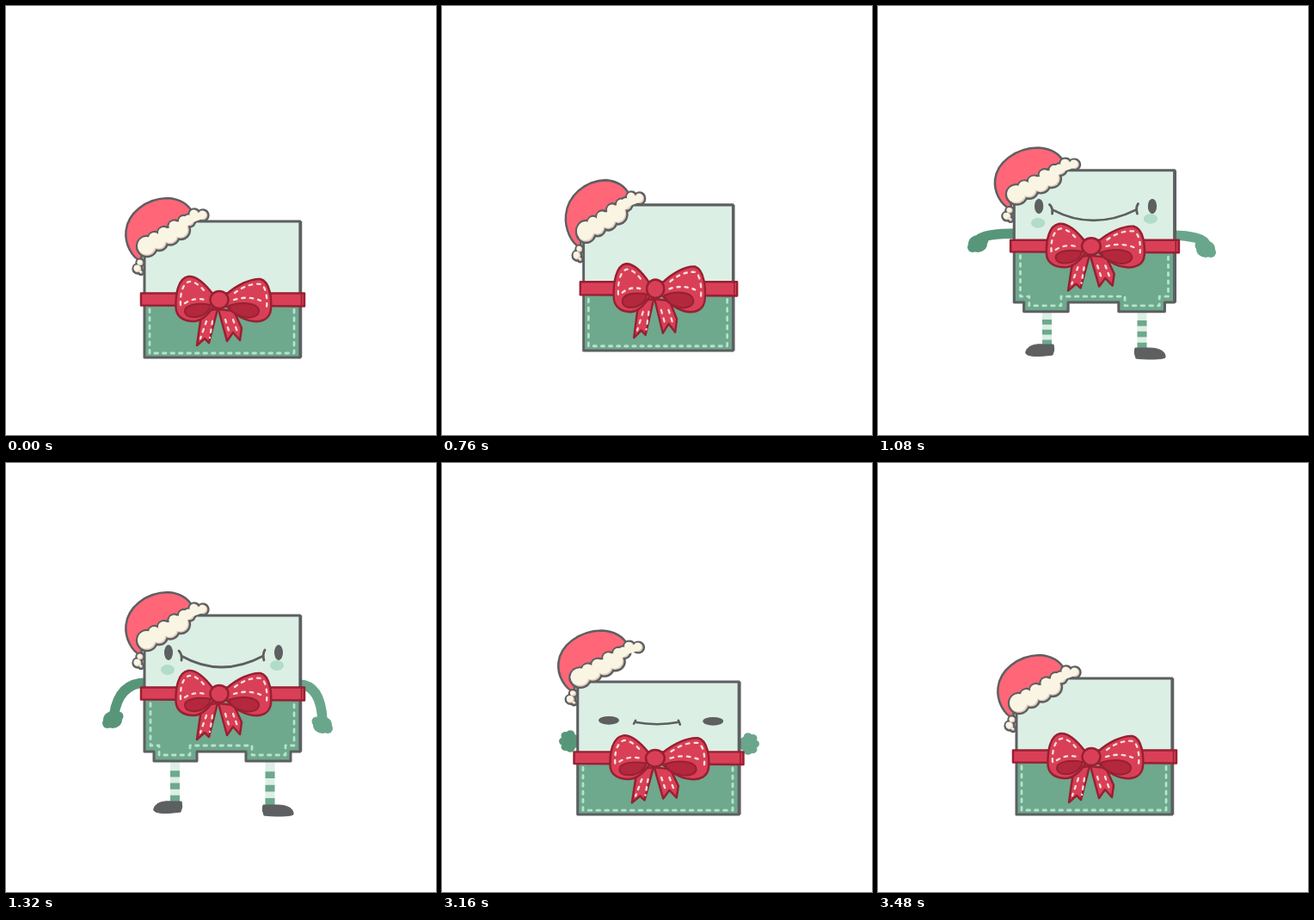
Write an HTML page that moves like this. It is 500 by 498 pixels and loops after 4000 ms.

```html
<!DOCTYPE html>
<html lang="en">
<head>
<meta charset="utf-8">
<title>Gift box</title>
<style>
  html, body { margin: 0; width: 100%; height: 100%; overflow: hidden; background: #fff; }
  svg { display: block; width: 100%; height: 100%; }
</style>
</head>
<body>
<svg id="stage" viewBox="0 0 500 498" stroke-linejoin="round"></svg>
<script>
const LOOP = 4000;
const INK = '#5d5f61', PALE = '#dcefe5', GREEN = '#6ea88d', STITCH = '#b4e3cb';
const RED = '#d94058', WINE = '#982032', HAT = '#ff6678', CREAM = '#faf5e3', SHADE = '#dfcabd';
const ARMS = ['#58967a', '#6aa68c'];

// Each pose is held until the next one begins.
// limbs: none | tuck | stand | tuft; hands: left x, y, right x, y
const poses = [
  { at: 0 },
  { at: 600, dx: .8, sx: 1.07, sy: .937 },
  { at: 680, sx: 1.1, sy: .9 },
  { at: 760, sx: .96, sy: 1.07, dy: -8 },
  { at: 840, dx: 3, dy: -52, rot: -4, limbs: 'tuck', face: 'open' },
  { at: 920, dx: 4.5, dy: -89, rot: -7.8, limbs: 'tuck', face: 'open' },
  { at: 1000, dy: -72, limbs: 'stand', face: 'open', hands: [81, 236, 418, 238] },
  { at: 1080, sx: 1.03, sy: .97, dy: -64, limbs: 'stand', face: 'smile', hands: [116, 276, 381, 282] },
  { at: 1160, dy: -79, limbs: 'stand', face: 'smile', hands: [114, 284, 383, 290], tilt: 8 },
  { at: 1240, dy: -76, limbs: 'stand', face: 'smile', hands: [119, 292, 376, 298], tilt: 4 },
  { at: 1320, dy: -73, limbs: 'stand', face: 'smile', hands: [124, 298, 368, 304] },
  { at: 3000, dy: -79, limbs: 'stand', face: 'smile', hands: [114, 284, 383, 290], tilt: 8 },
  { at: 3080, dy: -40, hat: -14, limbs: 'stand', face: 'smile', hands: [118, 276, 379, 282] },
  { at: 3160, sx: 1.036, sy: .975, hat: -34, limbs: 'tuft', face: 'flat' },
  { at: 3240, sx: 1.07, sy: .937, hat: -6 },
  { at: 3320, sx: .98, sy: 1.03 },
  { at: 3400, sx: 1.015, sy: .985 },
  { at: 3480 }
];

const path = (d, fill, stroke = 'none', width = 2.5, more = '') =>
  `<path d="${d}" fill="${fill}" stroke="${stroke}" stroke-width="${width}" ${more}/>`;
const oval = (x, y, rx, ry, fill, stroke = 'none', width = 2.5) =>
  `<ellipse cx="${x}" cy="${y}" rx="${rx}" ry="${ry}" fill="${fill}" stroke="${stroke}" stroke-width="${width}"/>`;
const line = (d, stroke, width, more = '') => path(d, 'none', stroke, width, more);
const dashes = (d, stroke, pattern, width) =>
  line(d, stroke, width, `stroke-dasharray="${pattern}" stroke-linecap="round"`);
const group = (transform, content) => `<g transform="${transform}">${content}</g>`;

// Union of outlined puffs with a shaded lower right rim.
function fluff(puffs) {
  const layer = (grow, shift, fill) =>
    puffs.map(([x, y, r]) => oval(x + shift, y + shift, r + grow, r + grow, fill)).join('');
  return layer(1.2, 0, INK) + layer(-1.2, 0, SHADE) + layer(-1.8, -.8, CREAM);
}

function hat() {
  return path('M158 297C146 292 138 276 139.5 261C141.5 241 162 223.5 188 223C203 224 212 230 217 240L203 256L166 280L157 284Z', HAT, INK) +
    fluff([[153, 305, 5.5], [156, 298, 4.5], [157, 309, 3]]) +
    fluff([[164, 279, 12], [173, 270, 8], [178, 274, 10], [184, 264, 8], [191, 267, 10.5], [196, 256, 7.5],
           [203, 260, 11], [207, 250, 7], [213, 249, 7.5], [219, 242, 6.5], [229, 243, 6.5]]) +
    line('M165 279L178 272L203 257L214 248L228 243', CREAM, 8, 'stroke-linecap="round"');
}

function bow() {
  return path('M157 333.5H347V348.5L157 347.5Z', RED, WINE) +
    line('M343.5 334V348', WINE, 1.5) +
    path('M229 354L226 366L222 394L231 386L236 391L246 352Z', RED, WINE) +
    path('M247 352L257 389L264 379L272 388L274 374L265 354Z', RED, WINE) +
    path('M241 335C232 323 222 313 212 314C200 316 197 335 197.5 350C198 361 207 366 218 366C228 366 236 357 242 348Z', RED, WINE) +
    path('M256 335C268 324 285 316 296 317C307 320 309 340 308 352C307 363 298 367 288 366C276 365 264 357 256 348Z', RED, WINE) +
    path('M238 347C222 344 207 347 208 355C209 362 219 362 226 360C233 357 237 352 238 347Z', '#b3283c', WINE, 2) +
    path('M259 348C272 343 292 344 294 353C295 360 285 363 277 361C268 359 261 355 259 348Z', '#b3283c', WINE, 2) +
    ['M203 347C202 330 208 318 216 320C223 322 229 328 233 334', 'M208 345Q220 337 234 342',
     'M266 333Q282 321 297 323C303 328 304 340 303 350', 'M265 341Q281 336 296 342',
     'M233 366L226 386', 'M240 366L237 385', 'M255 364L260 380', 'M264 364L270 381']
      .map(d => dashes(d, '#f8e2d8', '3.5 6', 2.3)).join('') +
    oval(248, 341, 10.5, 10, RED, WINE);
}

function box(standing) {
  const base = standing ? 'V408H331V419H279V408H222V419H172V408H161' : 'V408H161';
  const seam = standing ? 'M168 352V401H178V412H214V401H286V412H325V401H335V352' : 'M167 352V403H335V352';
  return path(`M161 250H342${base}Z`, PALE) +
    path(`M161 347H342${base}Z`, GREEN) +
    dashes(seam, STITCH, '3.5 6', 2.8) +
    line(`M161 250H342${base}Z`, INK, 3) +
    line('M342.5 250V408', INK, 3.5);
}

function face(kind) {
  const cheeks = oval(188, 313, 8, 6, '#b1dcc9') + oval(315, 308, 8, 6, '#b1dcc9');
  if (kind === 'smile')
    return cheeks + oval(189, 293, 5, 9, INK) + oval(317, 293, 5, 9, INK) +
      line('M201 291Q205 295 204 302M204 297Q250 323 299 297M301 290Q298 295 300 302', INK, 2.8, 'stroke-linecap="round"');
  if (kind === 'flat')
    return oval(196, 296, 11.5, 5, INK) + oval(313, 297, 11.5, 5, INK) +
      line('M224 300L226 296M225 298Q250 303 275 298M274 296L276 301', INK, 2.5, 'stroke-linecap="round"');
  if (kind === 'open') {
    const eye = (x, y) => oval(x, y, 9.5, 9.5, INK) + oval(x + 4, y - 4, 4, 4, '#fff') + oval(x - 3, y + 4, 2.2, 2.2, '#c9cccd');
    return cheeks + eye(187, 297) + eye(316.5, 292.5) +
      path('M221 297C225 292 246 293 266 290.5C280 288 283 297 278 302C270 309 240 310 227 306Q217 302 221 297Z', '#609d80', INK) +
      path('M223 301C229 296 236 297 239 301C246 297 253 300 254 307Q236 309 226 305Z', RED, WINE, 1);
  }
  return '';
}

const stripedLeg = (d, dash) => line(d, PALE, 11) + line(d, GREEN, 11, `pathLength="50" stroke-dasharray="${dash}"`);

function standingLimbs({ dy, hands: [lx, ly, rx, ry], tilt = 0 }) {
  const shoulder = 328 + dy, hip = 417 + dy;
  const arm = (d, x, y, side, color) => line(d, color, 11.5) +
    oval(x, y, 11, 10, color) + oval(x + side * 7, y - 4, 5.5, 5.5, color) + oval(x - side * 6, y + 4, 6, 6, color);
  const leg = (x, foot) => stripedLeg(`M${x} ${hip}V${foot}`, '0 13 7 7 7 7 9');
  return arm(`M163 ${shoulder}Q${lx + 7} ${shoulder} ${lx + 1.5} ${ly - 5}`, lx, ly, 1, ARMS[0]) +
    arm(`M341 ${shoulder + 2}Q${rx - 2} ${shoulder + 3} ${rx} ${ry - 5}`, rx, ry, -1, ARMS[1]) +
    leg(196.5, 395) + leg(307, 399) +
    group(`rotate(${-tilt} 203 398)`, path('M172 401C174 394 184 392 192 393H204Q206 399 203 405C190 407 169 408 172 401Z', INK, INK, 1)) +
    group(`rotate(${tilt} 300 402)`, path('M299 397H316C328 397 335 402 334 408C330 411 305 410 300 409Q297 402 299 397Z', INK, INK, 1));
}

function tuckedLimbs({ dx, dy }) {
  return group(`translate(${dx - 4.5} ${dy + 89})`,
    path('M168 244C148 243 140 253 141 267C142 280 152 288 176 287Z', ARMS[0]) +
    path('M343 225C354 220 366 222 380 234C378 248 365 260 345 266Z', ARMS[1], ARMS[1], 1) +
    oval(160, 239, 5, 7, PALE) + oval(355, 238, 4, 7, PALE) +
    stripedLeg('M213 334C211 352 235 359 254 347', '0 14 8 8 8 6 6') +
    stripedLeg('M323 321C328 345 305 354 279 348', '0 10 8 8 8 8 8') +
    line('M255 335L264 345L261 359M275 335L267 346L276 359', INK, 17, 'stroke-linecap="round"'));
}

function tufts() {
  const tuft = (x, y, side, color) => oval(x + side * -3, y, 9, 9, color) +
    [-100, -50, 0, 50, 100].map(deg => {
      const a = deg * Math.PI / 180;
      return oval(x + side * 7 * Math.cos(a), y + 8.5 * Math.sin(a), 5, 4.5, color);
    }).join('');
  return tuft(148, 323, -1, ARMS[0]) + tuft(357, 326, 1, ARMS[1]);
}

const limbDrawers = { none: () => '', stand: standingLimbs, tuck: tuckedLimbs, tuft: tufts };

function draw(pose) {
  const p = { dx: 0, dy: 0, sx: 1, sy: 1, rot: 0, hat: 0, limbs: 'none', ...pose };
  const standing = p.limbs === 'stand' || p.limbs === 'tuck';
  const placement = `translate(${p.dx} ${p.dy}) rotate(${p.rot} 251.5 329) ` +
    `translate(251.5 408) scale(${p.sx} ${p.sy}) translate(-251.5 -408)`;
  return limbDrawers[p.limbs](p) +
    group(placement, box(standing) + face(p.face) + group(`translate(0 ${p.hat})`, hat()) + bow());
}

const stage = document.getElementById('stage');
const start = performance.now();
let shown;

function tick() {
  const time = (performance.now() - start) % LOOP;
  const pose = poses.findLast(p => p.at <= time);
  if (pose !== shown) {
    stage.innerHTML = draw(pose);
    shown = pose;
  }
  requestAnimationFrame(tick);
}
tick();
</script>
</body>
</html>
```
